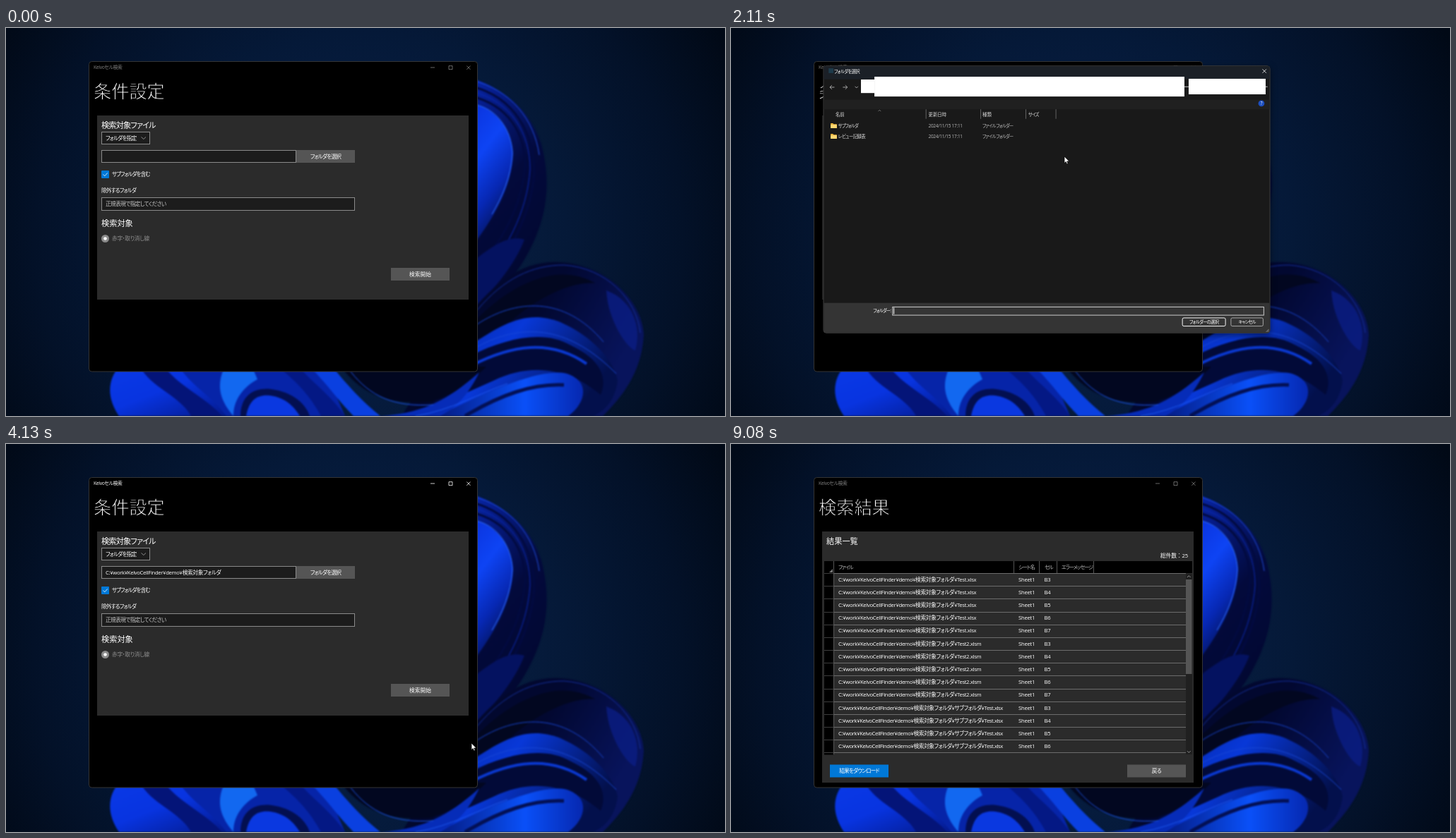
Write an HTML page that moves like this. It is 1018 px wide and 550 px high and loops after 9.15 s.

```html
<!DOCTYPE html>
<html lang="ja">
<head>
<meta charset="utf-8">
<title>セル検索</title>
<style>
html, body { margin: 0; width: 100%; height: 100%; overflow: hidden; background: #020a18 }
svg { display: block; width: 1018px; height: 550px }
text { font-family: "Open Sans", "Noto Sans CJK JP", "Noto Sans CJK", sans-serif; font-feature-settings: "palt"; white-space: pre }
/* a black outline thins the strokes of the large titles */
.big { font-family: "Noto Sans CJK JP", "Noto Sans CJK", sans-serif; font-weight: 200; stroke: #000; stroke-width: .8px }
.wide { font-feature-settings: normal }
#petals { filter: blur(.8px) }
</style>
</head>
<body>
<svg id="stage" viewBox="0 0 1018 550">
<defs>
  <radialGradient id="sky" gradientUnits="userSpaceOnUse" cx="500" cy="300" r="590">
    <stop offset="0" stop-color="#08224c"/><stop offset=".5" stop-color="#051938"/>
    <stop offset=".78" stop-color="#031128"/><stop offset="1" stop-color="#010916"/>
  </radialGradient>
  <linearGradient id="deep" x2=".5" y2="1"><stop stop-color="#0c34d0"/><stop offset=".3" stop-color="#061c88"/><stop offset=".6" stop-color="#030a3c"/><stop offset="1" stop-color="#020830"/></linearGradient>
  <linearGradient id="lobe" x2=".4" y2="1"><stop stop-color="#0a30d8"/><stop offset=".4" stop-color="#0e44f4"/><stop offset=".7" stop-color="#0728b4"/><stop offset="1" stop-color="#03104c"/></linearGradient>
  <linearGradient id="lit" x2=".9" y2="1"><stop stop-color="#0a3ae8"/><stop offset=".5" stop-color="#0834e0"/><stop offset="1" stop-color="#041a8c"/></linearGradient>
  <linearGradient id="fold" x2="1" y2=".4"><stop stop-color="#0524a0"/><stop offset=".45" stop-color="#0838d8"/><stop offset="1" stop-color="#03104c"/></linearGradient>
  <linearGradient id="glow" x2="1" y2="0"><stop stop-color="#041a80"/><stop offset=".6" stop-color="#0a50f8"/><stop offset="1" stop-color="#0628b0"/></linearGradient>
  <linearGradient id="dark" x2="1" y2=".4"><stop stop-color="#02082c"/><stop offset=".6" stop-color="#020830"/><stop offset="1" stop-color="#08145c"/></linearGradient>
</defs>
<rect width="1018" height="550" fill="url(#sky)"/>
<g id="petals">
  <path fill="url(#deep)" d="M600 60C690 66 740 110 758 165C774 225 765 280 728 338L660 430H600Z"/>
  <path fill="none" stroke="#2050e8" d="M660 74C715 88 748 130 755 180"/>
  <path fill="none" stroke="#020a40" stroke-width="3" d="M660 83C720 98 748 150 748 205C744 265 712 325 660 385M660 97C712 110 735 150 735 195C730 255 702 305 660 350"/>
  <path fill="none" stroke="#0a2ab8" d="M660 90C716 104 742 150 742 200C738 262 708 318 660 372"/>
  <path fill="url(#lobe)" d="M650 106C690 108 716 142 718 178C716 225 692 270 650 322Z"/>
  <path fill="none" stroke="#3070ff" d="M660 108C694 112 716 144 717 178C715 212 702 240 688 264"/>
  <path fill="#041260" d="M650 340C682 314 708 292 734 300C718 340 690 372 650 410Z"/>
  <path fill="url(#dark)" d="M640 425C690 360 730 329 785 332C850 336 900 385 903 435C900 490 870 525 845 550H560Z"/>
  <path fill="none" stroke="#1430a0" d="M667 400C705 355 745 336 790 336C850 340 893 385 898 432"/>
  <path fill="#020720" d="M640 440C710 360 780 330 835 362C800 358 740 385 690 440Z"/>
  <path fill="#0b1d84" d="M850 372C888 386 900 425 891 457C880 455 852 415 850 372Z" opacity=".8"/>
  <path fill="url(#fold)" d="M640 462C700 420 735 398 785 417C830 437 860 470 866 500C862 530 845 545 830 550H600Z"/>
  <path fill="#020a38" d="M640 474C700 440 760 426 800 450C842 470 852 495 842 520C805 488 750 470 690 500L600 540Z"/>
  <path fill="none" stroke="#0a38d0" stroke-width="4" d="M660 478C715 450 770 440 822 476"/>
  <path fill="url(#glow)" d="M610 550C690 512 750 485 790 489C825 497 825 528 796 550Z"/>
  <path fill="none" stroke="#031054" stroke-width="5" d="M650 550C700 520 745 504 790 506"/>
  <path fill="none" stroke="#1848d8" d="M667 420C720 385 790 378 846 445M667 452C735 415 800 425 864 490"/>
  <path fill="url(#lit)" d="M160 480C143 500 143 525 160 550H330L300 470Z"/>
  <path fill="#041478" d="M190 480C205 510 245 520 262 550H306C285 525 240 505 225 480Z"/>
  <path fill="#0624a8" d="M245 480C265 510 290 520 312 550H480L450 480Z"/>
  <path fill="#1268f0" d="M308 484C297 510 305 530 322 550C322 525 338 508 356 498L350 484Z"/>
  <path fill="#030f50" d="M332 550C332 520 352 509 376 512C405 516 424 532 430 550Z"/>
  <path fill="#0a38e0" d="M340 550C344 527 356 519 374 521C396 524 408 537 416 550Z"/>
  <path fill="#041884" d="M385 480C410 500 430 520 446 550H480C460 520 430 500 415 480Z"/>
  <path fill="#0a40e0" d="M430 480C455 505 472 530 492 550H530C505 530 482 505 462 480Z"/>
  <path fill="#020720" d="M474 480C505 520 540 534 600 530C640 518 660 500 680 480Z"/>
  <path fill="#062cb8" d="M530 550C590 546 625 528 670 488C655 520 635 540 615 550Z"/>
  <path fill="none" stroke="#1c58f0" d="M488 487C515 522 550 538 605 534M580 550C630 542 670 518 710 504"/>
</g>
<g id="app"></g>
<g id="dialog"></g>
<path id="cursor" fill="#fff" stroke="#000" stroke-width=".7" d="M0 0V9.6L2.2 7.6 3.6 10.9 5.2 10.2 3.8 7H6.8Z"/>
</svg>
<script>
const LOOP = 9150, $ = id => document.getElementById(id);

// kana and Latin are set tighter than kanji
const count = (s, re) => (s.match(re) || []).length;
const track = s => -(count(s, /[ぁ-ヶー]/g) * .15 + count(s, /[ -~¥]/g) * .035) / s.length;

const text = (x, y, s, size = 7.7, fill = '#fff', extra = '') =>
  `<text x="${x}" y="${y}" font-size="${size}" fill="${fill}" letter-spacing="${(track(s) * size).toFixed(3)}" ${extra}>${s}</text>`;
const mid = (x, y, s, size, fill) => text(x, y, s, size, fill, 'text-anchor="middle"');
const rect = (x, y, w, h, fill, stroke = 'none', extra = '') =>
  `<rect x="${x}" y="${y}" width="${w}" height="${h}" fill="${fill}" stroke="${stroke}" ${extra}/>`;
const line = (d, stroke = '#fff', w = .8) => `<path d="${d}" fill="none" stroke="${stroke}" stroke-width="${w}"/>`;
const fill = (d, color) => `<path d="${d}" fill="${color}"/>`;
const group = (id, ...parts) => `<g id="${id}">${parts.join('')}</g>`;
const button = (id, x, y, label, color = '#555') =>
  rect(x + .5, y + .5, 82, 17, color, color, `id="${id}"`) + mid(x + 41.5, y + 11.8, label);
const field = (x, y, w, h) => rect(x, y, w, h, '#1c1c1c', '#8a8a8a');
const title = s => text(124, 99.2, s, 25.2, '#fff', 'class="big"');
const heading = (y, s) => text(135, y, s, 11.2);

const root = 'C:¥work¥KelvoCellFinder¥demo¥検索対象フォルダ';

const settings = group('settings',
  title('条件設定'),
  rect(129, 124, 526, 261, '#2b2b2b'),
  heading(141.5, '検索対象ファイル'),
  field(135.5, 147.5, 68, 17),
  text(141, 158.6, 'フォルダを指定'),
  line('M191.5 154.5L194.8 157.5 198 154.5', '#aaa'),
  field(135.5, 173.5, 275, 17),
  text(141, 184.6, root, 7.7, '#fff', 'id="path"'),
  button('choose', 411, 173, 'フォルダを選択'),
  rect(135, 202, 11, 11, '#0078d7', 'none', 'rx="1"'),
  line('M137.5 207.5L139.8 209.8 143.8 205.3'),
  text(150, 210.4, 'サブフォルダを含む'),
  text(135, 232.6, '除外するフォルダ'),
  field(135.5, 240.5, 358, 18),
  text(141, 252.2, '正規表現で指定してください', 7.7, '#c8c8c8'),
  heading(281, '検索対象'),
  '<circle cx="140.5" cy="298.5" r="5.5" fill="#8a8a8a"/><circle cx="140.5" cy="298.5" r="2.3" fill="#fff"/>',
  text(150, 301.2, '赤字・取り消し線', 7.7, '#8f8f8f'),
  button('start', 545, 340, '検索開始'));

const files = ['Test.xlsx', 'Test2.xlsm', 'サブフォルダ¥Test.xlsx'];
const pitch = 18.17, rowTop = i => 183 + i * pitch;
const rowNumbers = [...Array(14).keys()];
const rowLines = [...Array(15).keys()].map(i => Math.round(rowTop(i)) + .5);

const results = group('results',
  title('検索結果'),
  rect(129, 124, 526, 356, '#2b2b2b'),
  heading(141.5, '結果一覧'),
  text(608, 160.5, '総件数：25', 7.7, '#fff', 'class="wide"'),
  rect(132, 166, 521, 17, '#000'),
  rect(132, 183, 13, 257.5, '#000'),
  group('hot', rect(132, 347, 13, 17, '#1c1c1c'), rect(146, 347, 498, 17.5, '#404040')),
  line(rowLines.map(y => `M146 ${y}H644`).join(''), '#6c6c6c', 1),
  line(rowLines.map(y => `M132 ${y}H145`).join(''), '#3c3c3c', 1),
  line('M145.5 166V440', '#555', 1),
  fill('M144 177V182H139Z', '#777'),
  text(152, 177.4, 'ファイル', 7.2, '#bbb'),
  rowNumbers.map(i => text(152, rowTop(i) + 11.8, root + '¥' + files[Math.floor(i / 5)])).join(''),
  group('columns',
    line('M393.5 166V183M429.5 166V183M454.5 166V183M506.5 166V183', '#555', 1),
    text(400, 177.4, 'シート名', 7.2, '#bbb'),
    text(437, 177.4, 'セル', 7.2, '#bbb'),
    text(461, 177.4, 'エラーメッセージ', 7.2, '#bbb'),
    rowNumbers.map(i => text(400, rowTop(i) + 11.8, 'Sheet1') + text(436.5, rowTop(i) + 11.8, 'B' + (3 + i % 5))).join('')),
  rect(650, 192, 1.6, 134, '#8c8c8c', 'none', 'id="thin"'),
  group('wide',
    rect(644, 184, 9, 256, '#202020'), rect(644, 192, 8.5, 134, '#555'),
    line('M646 189L648.3 186.7 650.6 189M646 435.2L648.3 437.5 650.6 435.2', '#aaa')),
  button('save', 140, 454.5, '結果をダウンロード', '#0078d7'),
  button('back', 561, 454.5, '戻る'));

$('app').innerHTML =
  rect(117.5, 47.5, 550, 439.5, '#000', '#343434', 'rx="4"') +
  group('caption', text(124, 58.4, 'Kelvoセル検索', 6.8),
    line('M601 56H607M627 53.7H632V58.7H627ZM652.3 53.6L657.5 58.8M657.5 53.6L652.3 58.8')) +
  settings + results;

const small = 6.6, soft = '#ddd';
const label = (x, y, s, color = soft) => text(x, y, s, small, color);
const folder = (x, y) => fill(`M${x} ${y}h3.4l1 1.2h4.6v6h-9z`, '#e8b23c') + rect(x, y + 2.2, 9, 5, '#ffd873');
const next = x => `M${x - 1.2} 76.5L${x + 1} 78.7 ${x - 1.2} 80.9`;
const crumbs = [[222, 'PC'], [242, 'ローカル ディスク (C:)'], [307, 'work'], [334, 'KelvoCellFinder'], [390, 'demo'], [419, '検索対象フォルダ']];
const entry = (y, name) => folder(131, y - 6) + label(142, y, name) +
  label(274, y, '2024/11/15 17:11', '#bbb') + label(353, y, 'ファイル フォルダー', '#bbb');

$('dialog').innerHTML =
  rect(120.5, 47.5, 653, 391, '#191919', '#404040', 'rx="4" style="filter:drop-shadow(0 3px 5px #0008)"') +
  rect(121, 48, 652, 19, '#1b2027') + rect(121, 97, 652, 14, '#202020') +
  line('M762.6 52.3L768.2 57.9M768.2 52.3L762.6 57.9') +
  line('M136.5 78.7H130M132.8 75.8L129.8 78.7 132.8 81.6M148.8 78.7H155.2M152.4 75.8L155.4 78.7 152.4 81.6M166.6 77.5L168.8 79.7 171 77.5', '#ccc') +
  group('loading',
    rect(128, 51, 7, 7, '#1d3a4a'), label(136, 58, 'フォルダを選択', '#fff'),
    line('M648 78H770', '#ccc', 1),
    rect(175.3, 67.4, 20, 19.8, '#fff'), rect(195, 63.3, 453.4, 29, '#fff'), rect(654.6, 66.3, 112.6, 22.8, '#fff')) +
  group('loaded',
    label(126, 58, 'フォルダを選択', '#fff'),
    line('M185 82V75.6M182.2 78.5L185 75.6 187.8 78.5'),
    rect(196.5, 69.5, 452, 18, '#191919', '#555'), folder(202, 74.5),
    crumbs.map(c => label(c[0], 81, c[1], '#fff')).join(''),
    line([215, 236, 300, 328, 384, 413].map(next).join('')),
    group('last', line(next(471))),
    line('M615.8 77.8L618 80 620.2 77.8M640.6 77A3 3 0 1 0 641 79.6M641 75.2V77.4H638.8', '#ccc'),
    rect(656.5, 69.5, 111, 18, '#191919', '#555'), label(661, 81, '検索対象フォルダの検索', '#777'),
    line('M753.5 81.5L755.8 79.2M755.4 77.8a2 2 0 1 1 4 0a2 2 0 1 1 -4 0', '#ccc'),
    label(131, 104.6, '整理', '#fff'), fill('M147.5 101.2H152L149.7 103.8Z', '#ddd'),
    label(168, 104.6, '新しいフォルダー', '#fff'),
    rect(722.5, 98.5, 8, 7.5, '#888', '#ccc'), line('M723 101H730M723 103.5H730', '#444', .6),
    fill('M736.3 101.2H741L738.6 103.8Z', '#ddd')) +
  '<circle id="help" cx="761" cy="102.4" r="4.5"/>' + mid(761, 104.9, '?', 6.6) +
  line('M270.5 111V125M350.5 111V125M416.5 111V125M460.5 111V125', '#666', 1) +
  line('M200.5 114L202.5 112 204.5 114', '#aaa', .6) +
  label(138, 120.7, '名前') + label(274, 120.7, '更新日時') + label(353, 120.7, '種類') + label(420, 120.7, 'サイズ') +
  entry(137.4, 'サブフォルダ') + entry(152.9, 'レビュー記録表') +
  fill('M121 394.5H773V435Q773 438 770 438H124Q121 438 121 435Z', '#343434') +
  label(193, 408.6, 'フォルダー:', '#fff') +
  rect(221.5, 400.5, 543, 12, '#353535', '#d0d0d0') + rect(223, 401.5, 1, 9.5, '#fff', 'none', 'id="caret"') +
  rect(645.5, 416.5, 63, 12, '#343434', '#fff', 'rx="2" id="pick"') + mid(677, 425, 'フォルダーの選択', small) +
  rect(716.5, 416.5, 47, 12, '#343434', '#aaa', 'rx="2"') + mid(740, 425, 'キャンセル', small) +
  line('M768 437L772 433M770 437L772 435', '#aaa');

// [first step, last step, number of steps, x, y reached]
const moves = [
  [210, 350, 3, 600, 345], [550, 680, 3, 521, 227], [820, 1230, 7, 472, 182],
  [2810, 3040, 4, 523, 337], [3190, 3600, 6, 659, 424], [4510, 4980, 7, 604, 351],
  [8220, 8220, 1, 886, 518], [8450, 8680, 4, 970, 562]];

function cursorAt(t) {
  let x = 1150, y = 620;
  for (const [from, to, n, x1, y1] of moves) {
    if (t < from) break;
    const gap = (to - from) / (n - 1) || 1;
    const p = Math.min(n, Math.floor((t - from) / gap + .02) + 1) / n;
    x += (x1 - x) * p;
    y += (y1 - y) * p;
  }
  return [x, y];
}

const set = (id, name, value) => $(id).setAttribute(name, value);
const show = (id, on) => set(id, 'display', on ? 'inline' : 'none');

function render(t) {
  const during = (a, b) => t >= a && t < b;
  const [x, y] = cursorAt(t);
  const over = (l, top, w, h) => x >= l && x < l + w && y >= top && y < top + h;
  const paint = (id, pressed, hover) => {
    set(id, 'fill', pressed ? '#7c7c7c' : '#555');
    set(id, 'stroke', pressed || hover ? '#7c7c7c' : '#555');
  };
  set('cursor', 'transform', `translate(${x} ${y})`);
  set('caption', 'opacity', during(1400, 1870) || during(4130, 9080) ? 1 : .5);

  show('settings', t < 7210);
  show('path', t >= 4080);
  paint('choose', during(1540, 1720), t < 1870 && over(411, 173, 83, 18));
  paint('start', during(5290, 5360) || during(5440, 7210), over(545, 340, 83, 18));

  show('results', t >= 7210);
  show('hot', t < 8220);
  set('columns', 'transform', `translate(${t < 7290 ? 0 : 7} 0)`);
  const grow = t < 7440 ? 0 : t < 7525 ? .35 : t < 7610 ? .7 : 1;
  set('wide', 'opacity', grow);
  set('thin', 'opacity', 1 - grow);

  const closing = t >= 4080, ready = t >= 2190;
  const k = closing || !ready ? .968 : t < 2260 ? .99 : 1;
  show('dialog', during(2110, 4130));
  set('dialog', 'opacity', closing ? .45 : 1);
  set('dialog', 'transform', `translate(447 243) scale(${k}) translate(-447 -243)`);
  show('loading', !ready);
  show('loaded', ready);
  show('last', t >= 2420);
  show('caret', t < 2660 || during(3190, 3720));
  set('help', 'fill', ready ? '#1f7ad0' : '#1d4fc0');
  const aim = over(645, 416, 64, 13);
  set('pick', 'fill', aim ? '#686868' : '#343434');
  set('pick', 'stroke', aim ? '#aaa' : '#fff');
}

function tick(now) {
  render(now % LOOP);
  requestAnimationFrame(tick);
}
render(0);
requestAnimationFrame(tick);
</script>
</body>
</html>
```
